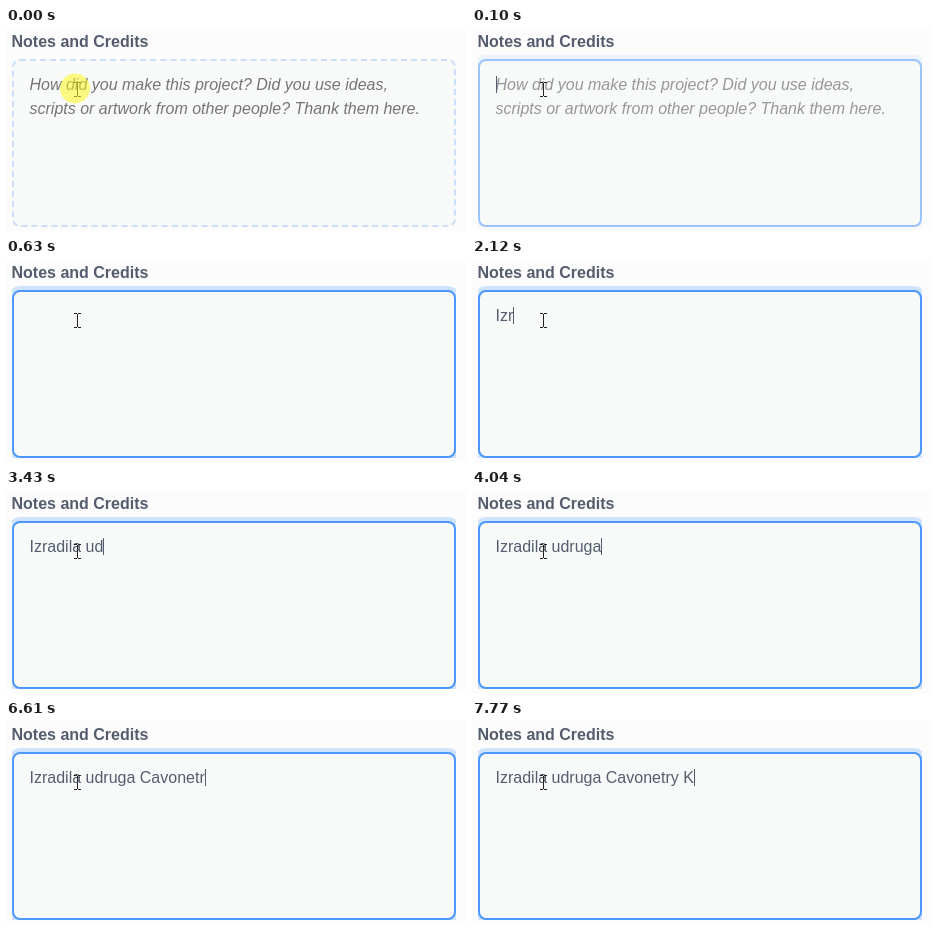
An HTML page with a canvas that plays this animation: 460x203 px, repeating every 8 s.

```html
<!DOCTYPE html>
<html lang="en">
<head>
<meta charset="utf-8">
<title>Notes field</title>
<style>
  html, body { margin: 0; width: 100%; height: 100%; overflow: hidden; background: #fcfcfc; }
  #clip { position: absolute; left: 6px; top: 24px; width: 444px; height: 175px; overflow: hidden; }
  #box {
    position: absolute; left: 0; top: 7px; width: 444px; height: 168px;
    box-sizing: border-box; border: 2px dashed #cbdffb; border-radius: 8px;
    background: #f8faf9;
  }
  canvas { position: absolute; left: 0; top: 0; }
</style>
</head>
<body>
<div id="clip"><div id="box"></div></div>
<canvas id="stage" width="460" height="203"></canvas>
<script>
const LOOP = 8000, CLICK = 100, BLINK = 530;
const FACE = '16px "Liberation Sans", Arial, sans-serif';
const INK = '#545c6e';
const LEFT = 23.5, BASE = 62, LINE = 24;
const HINT = [
  'How did you make this project? Did you use ideas,',
  'scripts or artwork from other people? Thank them here.'
];
// each burst is typed at its own steady pace
const BURSTS = [
  { text: 'I', start: 1100, pace: 160 },
  { text: 'zradila udruga ', start: 1960, pace: 160 },
  { text: 'Cavonetr', start: 4740, pace: 267 },
  { text: 'y K', start: 6990, pace: 390 }
];

const box = document.getElementById('box');
const ctx = document.getElementById('stage').getContext('2d');

const mix = (a, b, k) => a.map((v, i) => Math.round(v + (b[i] - v) * k));
const easeOut = (u, power) => 1 - Math.pow(1 - u, power);

function typing(t) {
  let typed = '', last = CLICK;
  for (const { text, start, pace } of BURSTS) {
    if (t < start) break;
    const n = Math.min(text.length, Math.floor((t - start) / pace) + 1);
    typed += text.slice(0, n);
    last = start + (n - 1) * pace;
  }
  return { typed, last };
}

function text(str, x, y, style, color) {
  ctx.font = (style + ' ' + FACE).trim();
  ctx.fillStyle = color;
  ctx.fillText(str, x, y);
}

function drawBox(k) {
  const edge = mix([203, 223, 251], [76, 151, 255], k);
  box.style.borderStyle = k ? 'solid' : 'dashed';
  box.style.borderColor = `rgb(${edge})`;
  box.style.boxShadow = k ? `0 0 0 4px rgba(76,151,255,${0.25 * k})` : 'none';
}

function drawPointer() {
  ctx.fillStyle = '#222';
  ctx.fillRect(71, 55, 1, 13);
  for (const y of [54, 68]) {
    ctx.fillRect(68, y, 3, 1);
    ctx.fillRect(72, y, 3, 1);
  }
}

function drawSpot() {
  ctx.fillStyle = 'rgba(255,245,30,0.55)';
  ctx.beginPath();
  ctx.arc(69, 60.5, 15, 0, Math.PI * 2);
  ctx.fill();
}

function draw(t) {
  const focused = t >= CLICK;
  const u = focused ? Math.min(1, (t - 80) / 230) : 0;
  const { typed, last } = typing(t);

  ctx.clearRect(0, 0, 460, 203);
  ctx.fontKerning = 'none';
  drawBox(easeOut(u, 5));

  text('Notes and Credits', 5.5, 19, 'bold', INK);
  ctx.globalAlpha = 1 - easeOut(u, 3);
  HINT.forEach((line, i) => text(line, LEFT, BASE + i * LINE, 'italic', '#757575'));
  ctx.globalAlpha = 1;
  text(typed, LEFT, BASE, '', INK);

  if (focused && (t - last) % (2 * BLINK) < BLINK) {
    ctx.fillRect(Math.floor(LEFT + 0.5 + ctx.measureText(typed).width), 48, 1, 17);
  }
  drawPointer();
  if (!focused) drawSpot();
}

const start = performance.now();
function tick() {
  draw((performance.now() - start) % LOOP);
  requestAnimationFrame(tick);
}
tick();
</script>
</body>
</html>
```
